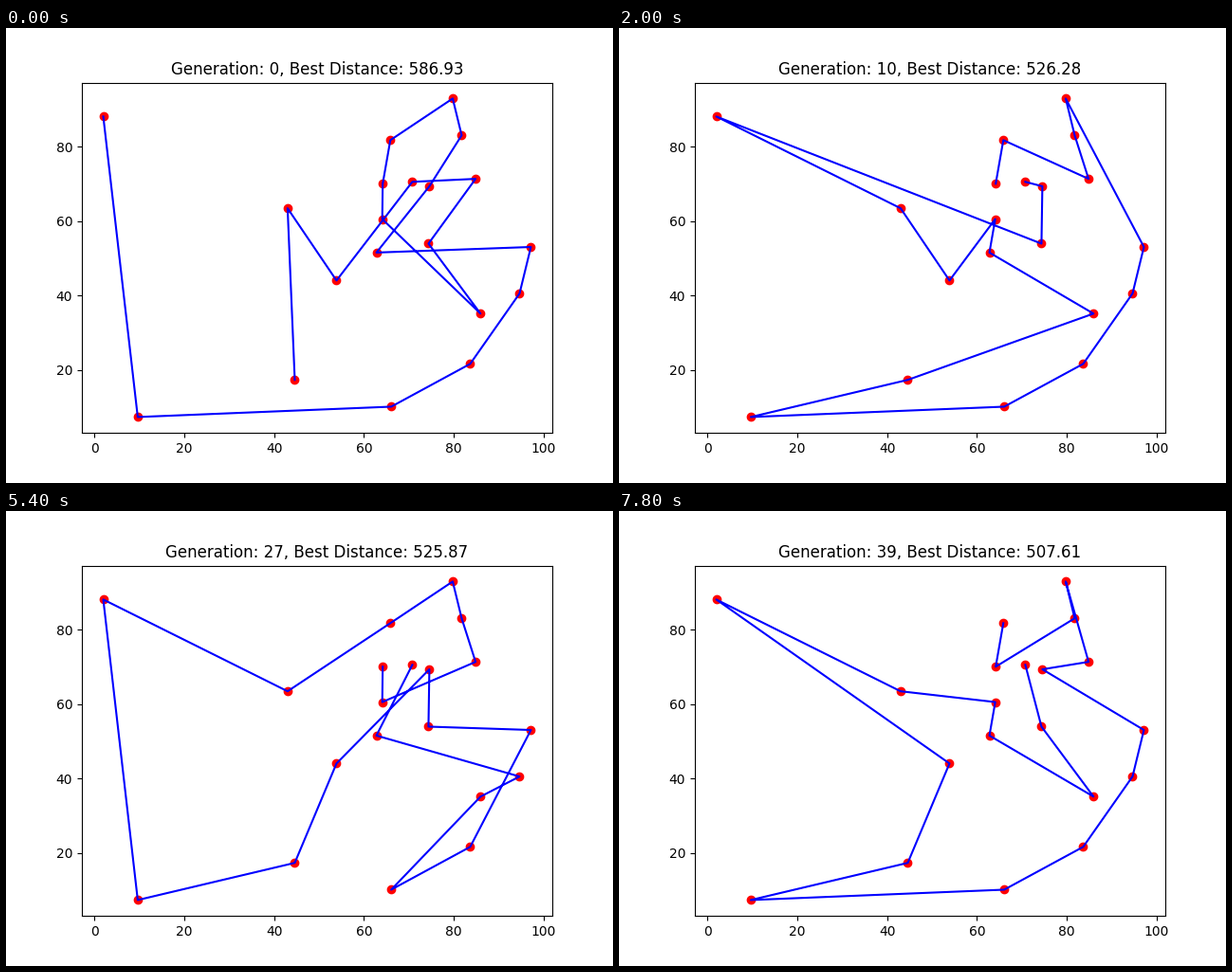
A matplotlib script for the animation above (8000 ms loop, 640x480 px).

```python
import matplotlib.pyplot as plt
from matplotlib.animation import FuncAnimation

CITIES = {
    "A": (1.92, 88.15), "B": (9.6, 7.42), "C": (43.0, 63.5), "D": (44.6, 17.4),
    "E": (53.9, 44.1), "F": (64.2, 70.1), "G": (64.1, 60.6), "H": (62.8, 51.6),
    "I": (65.9, 81.8), "J": (70.8, 70.6), "K": (74.6, 69.4), "L": (74.4, 54.0),
    "M": (84.9, 71.4), "N": (79.8, 92.98), "O": (81.8, 83.1), "P": (97.23, 53.1),
    "Q": (94.7, 40.6), "R": (86.0, 35.2), "S": (83.7, 21.7), "T": (66.1, 10.2),
}

# first generation, visiting order, closed tour length
BEST = [
    (0, "DCEJMLRGFINOKHPQSTBA", 586.93),
    (4, "JKMEHFRSLPQTDBACGINO", 528.21),
    (9, "JKLACEGHRDBTSQPNOMIF", 526.28),
    (15, "JHQRTSPLKEDBACINOMGF", 525.87),
    (35, "INOKMJLPQSRTBDCEAHGF", 519.18),
    (38, "IFONMKPQSTBDEACGHRLJ", 507.61),
]
GENERATIONS = 40

fig, ax = plt.subplots(figsize=(6.4, 4.8), dpi=100)
ax.scatter(*zip(*CITIES.values()), c="red")
route, = ax.plot([], [], "b-")
title = ax.set_title("")
ax.set_xlim(-2.85, 102.0)
ax.set_ylim(3.14, 97.26)


def draw(gen):
    _, order, length = [b for b in BEST if b[0] <= gen][-1]
    route.set_data(*zip(*(CITIES[c] for c in order)))
    title.set_text(f"Generation: {gen}, Best Distance: {length:.2f}")
    return route, title


anim = FuncAnimation(fig, draw, frames=GENERATIONS, interval=200,
                     repeat=True, repeat_delay=0)
plt.show()
```
